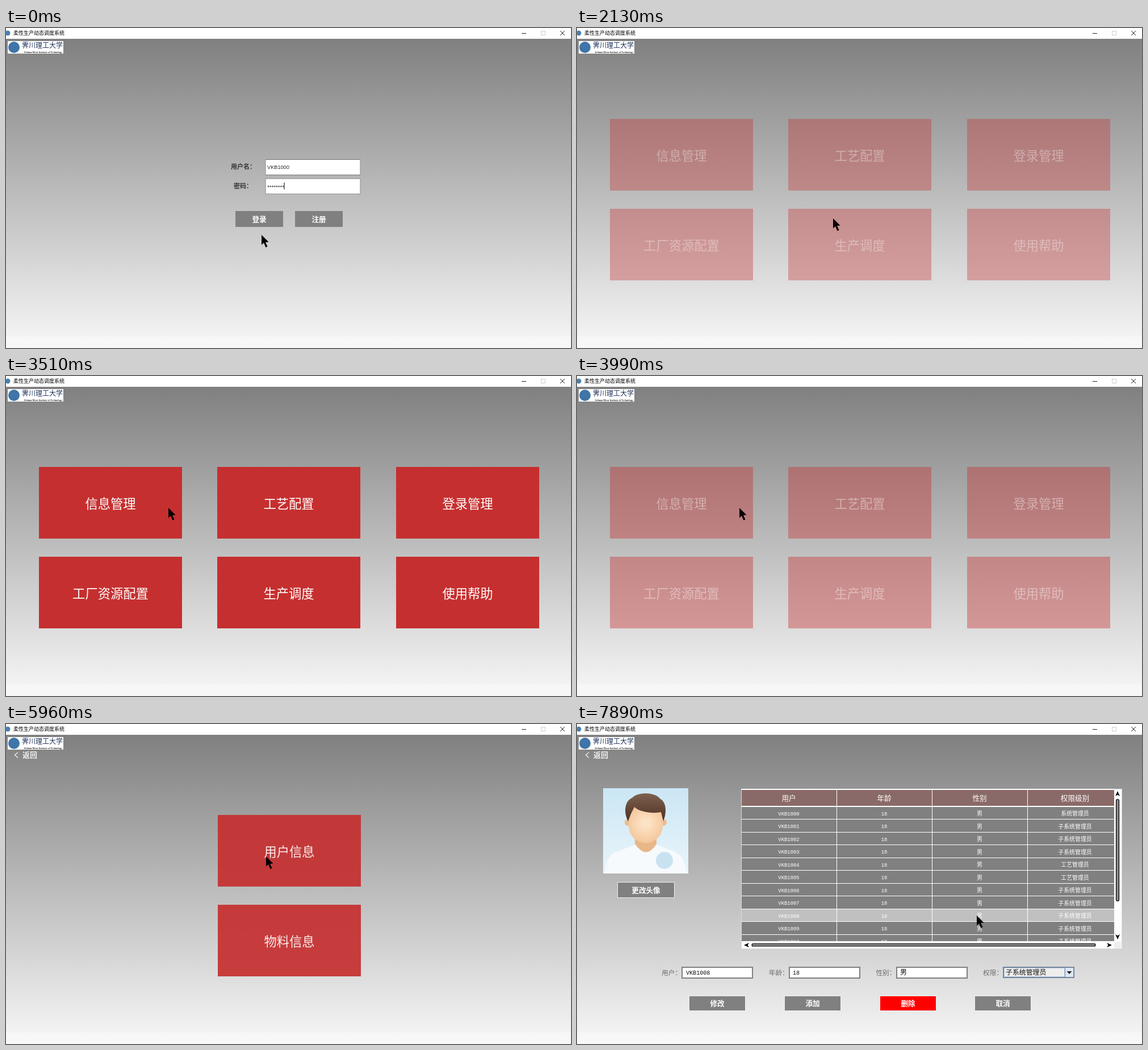
Recreate the animation shown at these times as an HTML page with a canvas. Size 995 by 563 pixels, loop 8000 ms.

```html
<!DOCTYPE html>
<html lang="zh">
<head>
<meta charset="utf-8">
<style>
html, body { margin: 0; width: 100%; height: 100%; overflow: hidden; background: #f7f7f7; }
canvas { display: block; }
</style>
</head>
<body>
<canvas id="stage" width="995" height="563"></canvas>
<script>
const ctx = document.getElementById('stage').getContext('2d');
const LOOP = 8000;
const CJK = '"Noto Sans CJK SC", "Noto Sans CJK", sans-serif';
const ARIAL = '"Liberation Sans", sans-serif';
const MONO = '"Liberation Mono", "Noto Sans CJK SC", monospace';
const GRAY = '#808080', RED = '#c62f2f';
const USER = 'VKB';

const clamp = v => Math.min(1, Math.max(0, v));
const span = (t, start, length) => clamp((t - start) / length);
const easeIn = u => u * u;
const easeOut = u => 1 - (1 - u) * (1 - u);
const smooth = u => u * u * (3 - 2 * u);

function rect(x, y, w, h, fill, line, width = 1) {
  ctx.fillStyle = fill;
  ctx.fillRect(x, y, w, h);
  if (!line) return;
  ctx.strokeStyle = line;
  ctx.lineWidth = width;
  ctx.strokeRect(x + width / 2, y + width / 2, w - width, h - width);
}

function circle(x, y, r, fill) {
  ctx.fillStyle = fill;
  ctx.beginPath();
  ctx.arc(x, y, r, 0, 7);
  ctx.fill();
}

function poly(points, x, y, fill, angle = 0) {
  ctx.save();
  ctx.translate(x, y);
  ctx.rotate(angle);
  ctx.fillStyle = fill;
  ctx.beginPath();
  points.forEach(p => ctx.lineTo(...p));
  ctx.fill();
  ctx.restore();
}

function strokes(color, width, ...lines) {
  ctx.strokeStyle = color;
  ctx.lineWidth = width;
  ctx.beginPath();
  for (const line of lines) line.forEach(([x, y], i) => i ? ctx.lineTo(x, y) : ctx.moveTo(x, y));
  ctx.stroke();
}

function path(d, fill) {
  ctx.fillStyle = fill;
  ctx.fill(new Path2D(d));
}

// y is the vertical middle of the glyphs
function text(s, x, y, size, color, { align = 'center', weight = 400, font = CJK } = {}) {
  ctx.font = `${weight} ${size}px ${font}`;
  ctx.textAlign = align;
  ctx.fillStyle = color;
  ctx.fillText(s, x, y + size * 0.37);
}

function button(label, x, y, w, h, fill = GRAY, line) {
  rect(x, y, w, h, fill, line);
  text(label, x + w / 2, y + h / 2, 12.6, '#fff', { weight: 700 });
}

function drawWindow() {
  const sky = ctx.createLinearGradient(0, 19, 0, 543);
  sky.addColorStop(0, GRAY);
  sky.addColorStop(1, '#f3f3f3');
  rect(0, 19, 995, 524, sky);
  rect(0, 543, 995, 20, '#f7f7f7');
  rect(0, 0, 995, 19, '#fff');
  circle(3, 9, 4.5, '#4a7fae');
  text('柔性生产动态调度系统', 13, 9, 9, '#000', { align: 'left' });
  strokes('#222', 1, [[908, 9.5], [916, 9.5]], [[976, 5], [984, 13]], [[984, 5], [976, 13]]);
  strokes('#ccc', 1, [[942.5, 5.5], [949.5, 5.5], [949.5, 12.5], [942.5, 12.5], [942.5, 5]]);

  rect(3, 23, 98, 22, '#fff');
  circle(14, 34, 10, '#3f75a8');
  text('霁川理工大学', 64, 31, 12, '#1c2f57', { weight: '500' });
  text('Jichuan Moor Institute of Technology', 65, 42, 4.2, '#222', { font: '"Liberation Serif", serif', weight: 700 });
}

function drawLogin(t) {
  const label = { align: 'left', weight: 700 };
  const input = { align: 'left', font: ARIAL };
  ctx.save();
  ctx.translate(0, Math.round(332 * easeIn(span(t, 1270, 520))));
  text('用户名：', 396, 244, 11, '#333', label);
  text('密码：', 401, 278, 11, '#333', label);
  rect(456.5, 231, 168, 28, '#fff', '#777');
  rect(456.5, 264.5, 168, 28, '#fff', '#777');
  text(USER + '1000', 460, 245, 9.2, '#222', input);
  text('********', 460, 279, 9.6, '#222', input);
  if (t < 1300 && t % 1000 % 850 < 350) rect(489.5, 272, 1, 12, '#000');
  const pressed = t >= 1150 && t < 1310;
  button('登录', 404, 322, 84, 28, pressed ? '#b8cfe5' : GRAY);
  button('注册', 509, 322, 84, 28);
  ctx.restore();
}

function tile(label, x, y, grow = 0) {
  const w = 252 * (1 + grow), h = 126 * (1 + grow);
  rect(x, y, w, h, RED);
  text(label, x + w / 2, y + h / 2 + 1.5, 22.3, '#fff');
}

const MENU = ['信息管理', '工艺配置', '登录管理', '工厂资源配置', '生产调度', '使用帮助'];
const SUBMENU = ['用户信息', '物料信息'];

// The clicked first tile swells on top of the others before the page fades.
function drawTiles(t, labels, columns, left, times) {
  const [show, swell, hide] = times;
  const grow = Math.sin(Math.PI * span(t, swell, 310)) / 3;
  ctx.save();
  ctx.beginPath();
  ctx.rect(left, 160, 314.5 * columns - 62, 284);
  ctx.clip();
  ctx.globalAlpha = easeOut(span(t, show, 800)) * (1 - easeIn(span(t, hide, 480)));
  for (let i = labels.length - 1; i >= 0; i--) {
    const x = Math.round(left + (i % columns) * 314.4), y = 160.5 + 157.5 * Math.floor(i / columns);
    tile(labels[i], x, Math.floor(y), i ? 0 : grow);
  }
  ctx.restore();
}

function drawBack() {
  strokes('#eee', 1.4, [[21, 50], [15.5, 54.5], [21, 59.5]]);
  text('返回', 29, 54.5, 13, '#eee', { align: 'left', weight: 700 });
}

function drawAvatar() {
  ctx.save();
  ctx.translate(46, 113);
  const air = ctx.createLinearGradient(0, 0, 0, 150);
  air.addColorStop(0, '#cbe6f4');
  air.addColorStop(1, '#e9f5fb');
  rect(0, 0, 150, 150, air);
  path('M3 150C6 124 13 114 29 110L57 99H93L121 110C137 115 145 128 147 150Z', '#f6fafd');
  path('M56 82H94V98Q76 127 56 98Z', '#e8b788');
  circle(44, 60, 6, '#eebb8c');
  circle(106, 60, 6, '#eebb8c');
  const skin = ctx.createRadialGradient(75, 62, 5, 75, 62, 42);
  skin.addColorStop(0, '#fde3c6');
  skin.addColorStop(1, '#f0bf90');
  path('M45 42Q45 20 75 20T105 42V68Q103 88 84 95Q75 98 66 95Q47 88 45 68Z', skin);
  const hair = ctx.createLinearGradient(0, 8, 0, 58);
  hair.addColorStop(0, '#80624f');
  hair.addColorStop(1, '#4c3024');
  path('M44 58C35 40 39 22 51 17C61 6 91 6 101 19C112 25 112 44 106 58L102 42C88 45 64 42 55 33L49 45Z', hair);
  circle(108, 127, 15, '#c9e2f1');
  ctx.restore();
}

function thumb(x, y, w, h) {
  ctx.beginPath();
  ctx.roundRect(x, y, w, h, 3);
  ctx.fillStyle = '#888';
  ctx.fill();
  ctx.strokeStyle = '#000';
  ctx.lineWidth = 1.2;
  ctx.stroke();
}

function role(i) {
  if (i === 0) return '系统管理员';
  return i === 4 || i === 5 ? '工艺管理员' : '子系统管理员';
}

function drawTable(hover) {
  const columnX = i => 373 + 168 * i;
  rect(289, 114, 671, 282, '#fff', '#d5dbe2');
  rect(290, 114, 656, 2, '#fff');
  ctx.save();
  ctx.beginPath();
  ctx.rect(290, 116, 656, 266);
  ctx.clip();
  rect(290, 116, 656, 28, '#8a6a68');
  ['用户', '年龄', '性别', '权限级别'].forEach((s, i) => text(s, columnX(i), 130, 12.6, '#fff', { weight: 500 }));
  for (let i = 0; i < 11; i++) {
    const y = 145.5 + 22.5 * i, mid = y + 12;
    const top = Math.round(y);
    rect(290, top, 656, 22, i === hover ? '#c0c0c0' : GRAY);
    rect(290, Math.round(y + 22.5) - 1, 656, 1, '#fff');
    [USER + (1000 + i), '18', '男', role(i)].forEach((s, c) =>
      text(s, columnX(c), mid, c < 2 ? 8.9 : 9.9, '#fff', { font: c < 2 ? MONO : CJK }));
  }
  for (let c = 0; c < 3; c++) rect(457 + 168 * c, 116, 1, 266, '#fff');
  ctx.restore();

  rect(946, 383, 12, 12, '#eee');
  thumb(949.5, 132.5, 5, 179);
  thumb(308, 386.5, 605, 4.5);
  const head = [[0, 0], [9, -4], [6.5, 0], [9, 4]];
  poly(head, 294, 389, '#000');
  poly(head, 942, 389, '#000', Math.PI);
  poly(head, 952, 118, '#000', Math.PI / 2);
  poly(head, 952, 379, '#000', -Math.PI / 2);
}

function drawEditor(t) {
  const left = { align: 'left' };
  ['用户：', '年龄：', '性别：', '权限：'].forEach((s, i) =>
    text(s, 149 + 188.7 * i, 437.5, 11.7, '#6c6c6c', { align: 'left', weight: 500 }));
  for (let i = 0; i < 3; i++) rect(184 + 189 * i, 427, 126, 21, '#fff', GRAY, 2);
  rect(750, 427, 126, 20, '#eee', '#74859a', 2);
  rect(752, 429, 107, 16, '#eee', '#b8cfe5');
  rect(859, 428, 16, 18, '#dce8f4', '#7a8a99');
  poly([[0, 0], [9, 0], [4.5, 5]], 862.5, 435, '#222');
  if (t >= 7860) {
    text(USER + '1008', 192, 437, 10.1, '#111', { align: 'left', font: MONO });
    text('18', 380, 437, 10.1, '#111', { align: 'left', font: MONO });
    text('男', 569, 437, 12, '#111', left);
  }
  if (t >= 7890) text('子系统管理员', 755, 437, 11.9, '#111', left);
  ['修改', '添加', '删除', '取消'].forEach((s, i) =>
    button(s, Math.round(197 + 167.8 * i), 478, 100, 27, i === 2 ? '#f00' : GRAY, '#eee'));
}

const MOVES = [
  [20, 450, 364], [370, 451, 335], [2200, 451, 335], [2770, 299, 247], [2920, 286, 232],
  [4300, 286, 232], [4720, 295, 231], [5060, 458, 233], [6750, 458, 233],
  [7120, 620, 299], [7250, 620, 299], [7480, 704, 337], [LOOP, 704, 337]
];
const CLICKS = [[1150, 1310], [3090, 3240], [5090, 5250], [7680, 7860]];
const POINTER = [[0, 0], [0, 17.5], [4, 14], [7.5, 22], [10.5, 20.5], [7, 13], [12.5, 12.5]];

function pointerAt(t) {
  const next = Math.max(1, MOVES.findIndex(m => m[0] > t));
  const [t0, x0, y0] = MOVES[next - 1], [t1, x1, y1] = MOVES[next];
  const u = smooth(span(t, t0, t1 - t0));
  return [Math.round(x0 + (x1 - x0) * u), Math.round(y0 + (y1 - y0) * u)];
}

function drawPointer(t, x, y) {
  poly(POINTER, x, y, '#000');
  if (CLICKS.some(([on, off]) => t >= on && t < off)) circle(x + 6.5, y + 6.5, 22, 'rgba(40,200,40,.4)');
}

function draw(t) {
  const [x, y] = pointerAt(t);
  drawWindow();
  if (t < 1790) drawLogin(t);
  else if (t < 4100) drawTiles(t, MENU, 3, 58, [1970, 3200, 3620]);
  else {
    drawBack();
    if (t < 6600) drawTiles(t, SUBMENU, 1, 373, [4260, 5470, 5820]);
    else {
      drawAvatar();
      button('更改头像', 71, 278, 101, 28, GRAY, '#eee');
      drawTable(t >= 6780 ? Math.floor((y - 145) / 22.5) : -1);
      drawEditor(t);
    }
  }
  drawPointer(t, x, y);
}

function frame() {
  draw(performance.now() % LOOP);
  requestAnimationFrame(frame);
}
frame();
</script>
</body>
</html>
```
